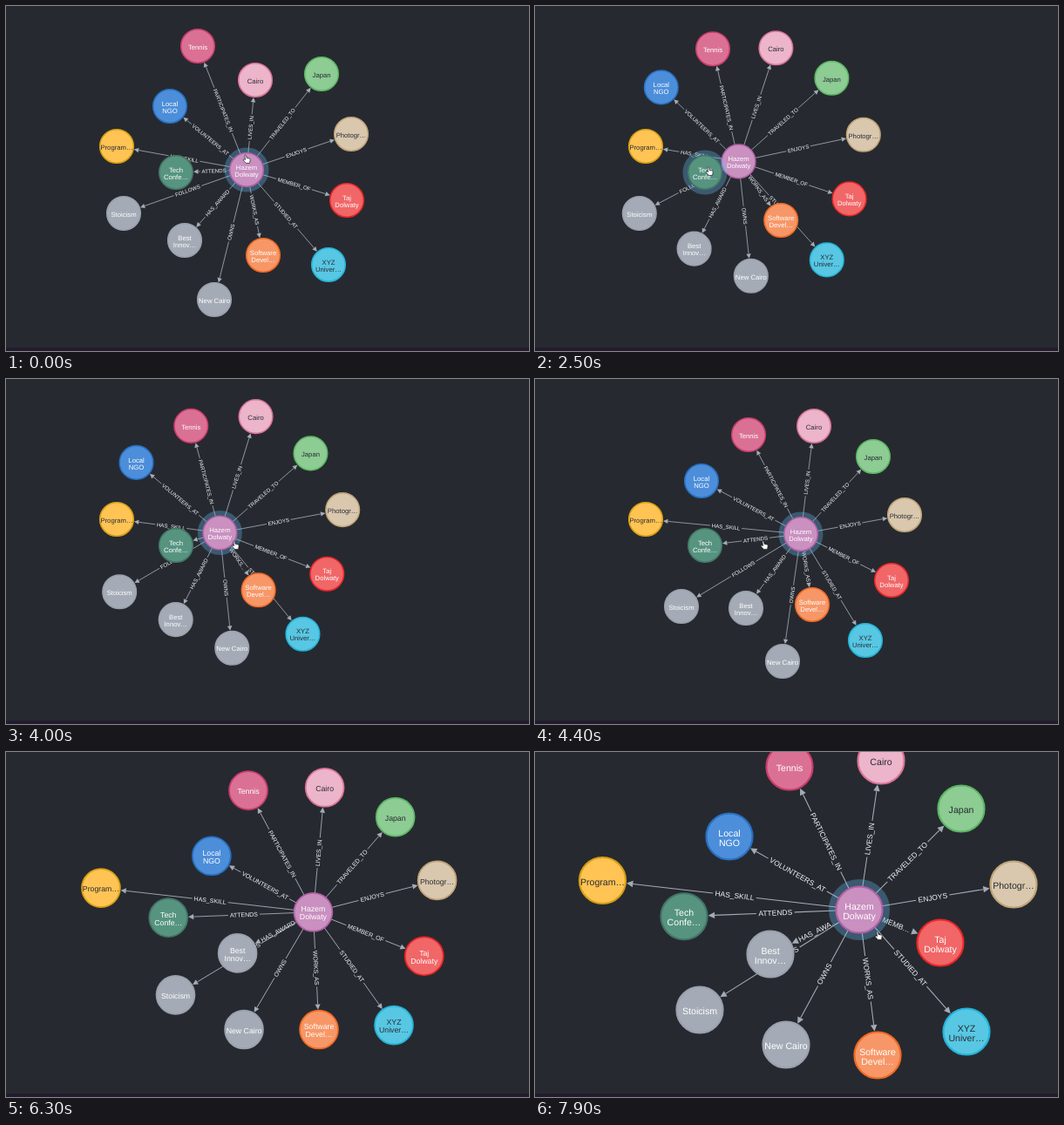
Animation of 600x396 px, one loop 8 s. Source, as an HTML page:

```html
<!DOCTYPE html>
<html lang="en">
<head>
<meta charset="utf-8">
<title>Graph view</title>
<style>
  html, body { margin: 0; width: 100%; height: 100%; overflow: hidden; background: #262a30; }
  svg { display: block; width: 600px; height: 396px; }
  text { font-family: "Liberation Sans", Arial, sans-serif; text-anchor: middle; text-rendering: geometricPrecision; }
  .caption { font-size: 7.7px; }
  .rel { font-size: 6.16px; fill: #f4f5f7; }
  .shaft { stroke: #a5abb6; stroke-width: .77; fill: none; }
  .head { fill: #a5abb6; }
  .halo { stroke: #6ac6ff; stroke-opacity: .3; fill: none; }
</style>
</head>
<body>
<svg viewBox="0 0 600 396">
  <rect width="600" height="396" fill="#262a30"/>
  <g id="camera"><g id="edges"></g><g id="nodes"></g></g>
  <rect y="392" width="600" height="4" fill="#211b2d"/>
  <g id="hand" fill="#fff" stroke="#15171b" stroke-width=".7" stroke-linejoin="round">
    <path d="M-2.2 -4.6Q-1.3 -5.6 -.5 -4.5L.2 -1.6L3.2 -1Q4.4 -.6 4.2 .6L3.6 4.4H-.6L-3.8 .9Q-3.8 -.4 -2.4 .1L-1.5 .5Z"/>
  </g>
  <g id="arrow" fill="#17191d" stroke="#fff" stroke-width=".8" stroke-linejoin="round">
    <path d="M0 0V8.2L1.9 6.5L3.2 9.3L4.6 8.6L3.4 5.9H5.8Z"/>
  </g>
</svg>
<script>
const LOOP = 8000, STEP = 100;
const R = 19.3, HEAD = 5.4, REL_SIZE = 6.16;
const ZOOM = 1.375, PIVOT = [259, 197];
const DARK = '#2a2c34', WHITE = '#fff';
const GREY = ['#a5abb6', '#9aa1ac', WHITE];

const $ = id => document.getElementById(id);
const lerp = (a, b, p) => a + (b - a) * p;
const mix = (a, b, p) => [lerp(a[0], b[0], p), lerp(a[1], b[1], p)];
const clamp = v => Math.max(0, Math.min(1, v));
const cubic = p => p < .5 ? 4 * p ** 3 : 1 - 4 * (1 - p) ** 3;

function add(parent, tag, attrs = {}, text = '') {
  const el = document.createElementNS('http://www.w3.org/2000/svg', tag);
  for (const k in attrs) el.setAttribute(k, attrs[k]);
  el.textContent = text;
  parent.append(el);
  return el;
}
function set(el, attrs) {
  for (const k in attrs) el.setAttribute(k, attrs[k]);
}

// Places: rest, pulled left, pulled right, then two read at full zoom.
const unzoom = p => p.map((v, i) => PIVOT[i] + (v - PIVOT[i]) / ZOOM);
function node(caption, rel, [fill, stroke, ink], places) {
  const p = places.split(' ').map(s => s.split(',').map(Number));
  const [rest, left, right, wide, last] = p;
  const poses = p.length === 1 ? Array(6).fill(rest)
    : [rest, mix(rest, left, .8), left, right, unzoom(wide), unzoom(last)];
  return { lines: caption.split('|'), rel, fill, stroke, ink, poses };
}

const nodes = [
  node('Hazem|Dolwaty', '', ['#c990c0', '#b261a5', WHITE], '276,188 223,176 305,178 372,181 372,181'),
  node('Stoicism', 'FOLLOWS', GREY, '135,238 116,238 168,261 181,296 189,296'),
  node('Tennis', 'PARTICIPATES_IN', ['#da7194', '#cc3c6c', WHITE], '220,46 200,50 245,64 282,12 292,17'),
  node('Cairo', 'LIVES_IN', ['#ecb5c9', '#da7298', DARK], '286,85 274,39 320,54 388,8 397,10'),
  node('Japan', 'TRAVELED_TO', ['#8dcc93', '#5db665', DARK], '362,78 335,84 388,89 486,49 489,65'),
  node('Photogr…', 'ENJOYS', ['#d9c8ae', '#c0a378', DARK], '396,147 372,148 424,156 544,137 549,152'),
  node('Taj|Dolwaty', 'MEMBER_OF', ['#f16667', '#eb2728', WHITE], '391,223 353,221 409,231 526,242 465,219'),
  node('XYZ|Univer…', 'STUDIED_AT', ['#57c7e3', '#23b3d7', DARK], '370,297 326,290 379,300 484,338 495,321'),
  node('Software|Devel…', 'WORKS_AS', ['#f79767', '#f36924', WHITE], '295,286 279,236 318,259 380,344 393,348'),
  node('New Cairo', 'OWNS', GREY, '239,337 250,303 284,324 276,344 288,336'),
  node('Best|Innov…', 'HAS_AWARD', GREY, '205,269 177,281 242,263 267,238 270,232'),
  node('Local|NGO', 'VOLUNTEERS_AT', ['#4c8eda', '#2870c2', WHITE], '188,115 134,88 191,117 231,103 223,97'),
  node('Program…', 'HAS_SKILL', ['#ffc454', '#d7a013', DARK], '127,161'),
  node('Tech|Confe…', 'ATTENDS', ['#569480', '#447666', WHITE], '195,191'),
];
const [hub, stoic] = nodes, member = nodes[6], tech = nodes[13];

// [time, pose]
const moves = [[0, 0], [2200, 0], [2500, 1], [3300, 1], [3600, 2], [3850, 2],
  [4400, 3], [4900, 4], [7200, 4], [7600, 5], [LOOP, 5]];

// [time, x, y]
const pointer = [[0, 276, 176], [500, 276, 178], [900, 258, 200], [1200, 250, 207], [1400, 238, 205],
  [1800, 208, 194], [2200, 200, 190], [3300, 200, 190], [3600, 263, 191], [4400, 263, 191],
  [4900, 330, 190], [5000, 340, 190], [5200, 560, 285], [5400, 575, 250], [5900, 610, 220],
  [6600, 610, 220], [7000, 560, 262], [7200, 500, 268], [7300, 510, 254], [7600, 452, 231],
  [7700, 430, 228], [7900, 394, 211], [LOOP, 394, 211]];

// [from, to, node, whether the relation is lit instead]
const halos = [[0, 950, hub], [1200, 1750, stoic, true], [1750, 3850, tech],
  [3850, 5050, hub], [7300, 7650, member], [7750, LOOP, hub]];
const arrowTimes = [[950, 1750], [5050, 6900]];

const pen = document.createElement('canvas').getContext('2d');
pen.font = '100px "Liberation Sans", Arial, sans-serif';
const widthOf = s => pen.measureText(s).width / 100 * REL_SIZE;

function fit(label, room) {
  if (widthOf(label) + 2.3 <= room) return label;
  for (let n = label.length - 1; n > 0; n--) {
    const cut = label.slice(0, n) + '…';
    if (widthOf(cut) + 2.3 <= room) return cut;
  }
  return '';
}

for (const n of nodes) {
  if (n.rel) {
    n.edge = add($('edges'), 'g');
    n.glow = add(n.edge, 'path', { class: 'halo', 'stroke-width': 12.3 });
    n.shaft = add(n.edge, 'path', { class: 'shaft' });
    n.head = add(n.edge, 'path', { class: 'head' });
    n.label = add(n.edge, 'text', { class: 'rel' });
  }
  n.el = add($('nodes'), 'g');
  n.ring = add(n.el, 'circle', { class: 'halo', r: R + 3.1, 'stroke-width': 6.2 });
  add(n.el, 'circle', { r: R, fill: n.fill, stroke: n.stroke, 'stroke-width': 1.54 });
  n.lines.forEach((line, i) => add(n.el, 'text', {
    class: 'caption', fill: n.ink, y: 3.7 + (i - (n.lines.length - 1) / 2) * 7.9
  }, line));
}

function segment(keys, t) {
  let i = 0;
  while (i < keys.length - 2 && t >= keys[i + 1][0]) i++;
  const a = keys[i], b = keys[i + 1];
  return [a, b, clamp((t - a[0]) / (b[0] - a[0]))];
}

function drawEdge(n) {
  const dx = n.pos[0] - hub.pos[0], dy = n.pos[1] - hub.pos[1];
  const end = Math.hypot(dx, dy) - R - .8, neck = end - HEAD;
  const room = Math.max(0, neck - R), mid = (R + neck) / 2;
  const label = fit(n.rel, room);
  const gap = label ? Math.min(room, widthOf(label) + 3.5) / 2 : 0;
  const angle = Math.atan2(dy, dx) * 180 / Math.PI;
  set(n.edge, { transform: `translate(${hub.pos}) rotate(${angle})` });
  set(n.glow, { d: `M${R} 0H${end}` });
  set(n.shaft, { d: `M${R} 0H${mid - gap}M${mid + gap} 0H${neck}` });
  set(n.head, { d: `M${end} 0L${neck} -2.7V2.7Z` });
  set(n.label, { transform: `translate(${mid} 0) rotate(${dx < 0 ? 180 : 0})`, y: 2.1 });
  if (n.label.textContent !== label) n.label.textContent = label;
}

function draw(t) {
  const [from, to, p] = segment(moves, t);
  const lit = halos.find(h => t >= h[0] && t < h[1]) || [];
  for (const n of nodes) {
    n.pos = mix(n.poses[from[1]], n.poses[to[1]], p);
    set(n.el, { transform: `translate(${n.pos})` });
    n.ring.style.display = lit[2] === n && !lit[3] ? '' : 'none';
    if (n.rel) {
      n.glow.style.display = lit[2] === n && lit[3] ? '' : 'none';
      drawEdge(n);
    }
  }

  const zoom = lerp(1, ZOOM, cubic(clamp((t - 6120) / 400)));
  set($('camera'), { transform: `translate(${PIVOT}) scale(${zoom}) translate(${PIVOT.map(v => -v)})` });

  const [a, b, q] = segment(pointer, t);
  const spot = mix(a.slice(1), b.slice(1), q);
  const isArrow = arrowTimes.some(([s, e]) => t >= s && t < e);
  for (const id of ['hand', 'arrow']) {
    set($(id), { transform: `translate(${spot})` });
    $(id).style.display = (id === 'arrow') === isArrow ? '' : 'none';
  }
}

const start = performance.now();
function tick() {
  const t = (performance.now() - start) % LOOP;
  draw(Math.floor(t / STEP) * STEP);
  requestAnimationFrame(tick);
}
tick();
</script>
</body>
</html>
```
